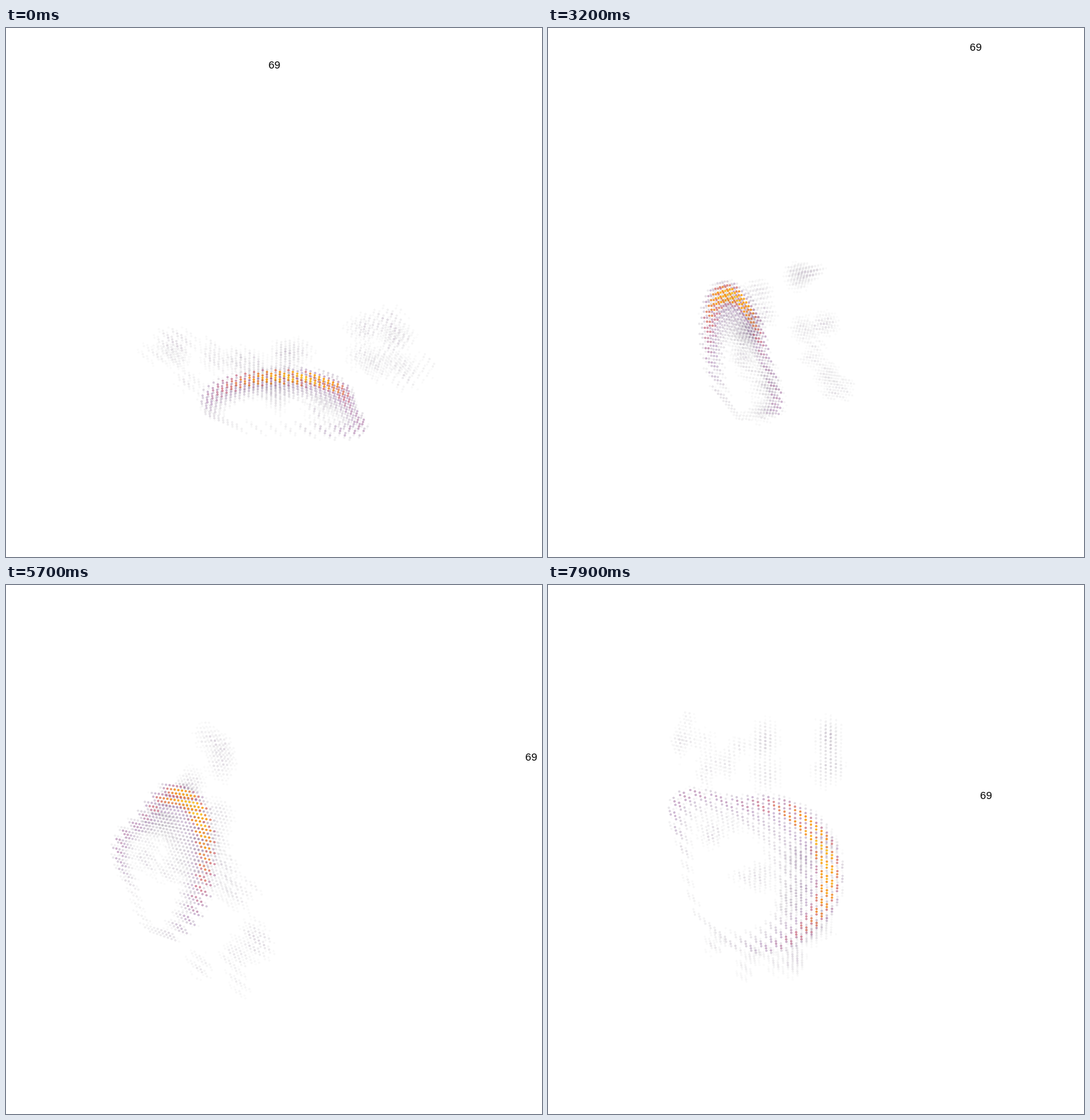
Recreate the animation shown at these times as an HTML page with a canvas. Size 753 by 744 pixels, loop 8 s.

```html
<!DOCTYPE html>
<html lang="en">
<head>
<meta charset="utf-8">
<title>Rotating point volume</title>
<style>
html, body { margin: 0; width: 100%; height: 100%; overflow: hidden; background: #fff; }
canvas { display: block; width: 753px; height: 744px; }
</style>
</head>
<body>
<canvas id="stage" width="753" height="744"></canvas>
<script>
const ctx = document.getElementById('stage').getContext('2d');
const W = 753, H = 744, CX = 376, CY = 372, EYE = 1400;
const LOOP = 8000, STEP = 100, SPIN = Math.PI / 6; // radians per second
const rad = deg => deg * Math.PI / 180;

// Spin axis and two directions across it: x right, y down, z away from the viewer.
const AXIS = [0.582, -0.73, 0.36];
const E1 = [-0.813, -0.532, 0.237];
const E2 = [0.018, -0.43, -0.903];

function camera(angle) {
  const c = Math.cos(angle), s = Math.sin(angle);
  const u = E1.map((e, i) => e * c + E2[i] * s);
  const v = E2.map((e, i) => e * c - E1[i] * s);
  return (p, q, w) => {
    const [x, y, z] = AXIS.map((a, i) => u[i] * p + v[i] * q + a * w);
    const k = EYE / (EYE + z);
    return { x: CX + x * k, y: CY + y * k, z, flat: x };
  };
}

// Dark, purple, red, orange, yellow
const RAMP = [[0, 0, 4], [87, 16, 110], [188, 55, 84], [249, 142, 9], [250, 225, 40]];
function ramp(v) {
  const t = Math.min(0.999, v) * 4, i = Math.floor(t);
  return RAMP[i].map((a, n) => Math.round(a + (RAMP[i + 1][n] - a) * (t - i)));
}

let seed = 11;
function random() {
  seed = (seed * 16807) % 2147483647;
  return seed / 2147483647;
}
const spread = (mid, half) => mid + half * (2 * random() - 1);

// Bright curved sheet seen face on: a round rim with one corner, glowing on the right.
function sheet(x, y, depth) {
  const dx = x - 290, dy = y - 408, a = Math.atan2(dy, dx);
  const corner = Math.exp(-(((a + rad(135)) / 0.36) ** 2));
  const rim = 108 + 9 * Math.cos(a) + 55 * corner;
  const glow = 0.05 + 0.85 * ((1 + Math.cos(a + 0.25)) / 2) ** 1.6 + 0.2 * corner;
  const d = rim - Math.hypot(dx, dy);
  const width = 7 + 12 * glow;
  const core = glow * Math.exp(-(((d - width * 0.75) / width) ** 4));
  const fill = d > 0 ? Math.min(0.38, glow) * Math.max(0, 1 - d / (15 + 105 * glow)) : 0;
  return Math.max(core, fill) * Math.exp(-(((depth + 138) / 11) ** 4));
}

// Faint clouds scattered in a few regions around the sheet
const REGIONS = [
  { x: 295, y: 228, depth: -62, w: 110, h: 42, thick: 16, count: 18 },
  { x: 300, y: 530, depth: -65, w: 65, h: 28, thick: 14, count: 7 },
  { x: 365, y: 425, depth: -100, w: 38, h: 65, thick: 16, count: 13 },
  { x: 255, y: 380, depth: -128, w: 48, h: 45, thick: 6, count: 6 }
];
const blobs = REGIONS.flatMap(r => Array.from({ length: r.count }, () => ({
  x: spread(r.x, r.w), y: spread(r.y, r.h), depth: spread(r.depth, r.thick),
  rx: spread(14, 6), ry: spread(17, 7), v: spread(0.085, 0.03)
})));
function clouds(x, y, depth) {
  let sum = 0;
  for (const b of blobs) {
    const r = ((x - b.x) / b.rx) ** 2 + ((y - b.y) / b.ry) ** 2 + ((depth - b.depth) / 16) ** 2;
    if (r < 3) sum += b.v * Math.exp(-r);
  }
  return Math.min(sum, 0.14);
}

// Layers of a staggered grid; only the visible points are kept.
const points = [];
const front = camera(rad(237)), side = camera(rad(123));
for (let i = -38; i <= 24; i++) {
  for (let j = -22; j <= 22; j++) {
    for (let k = -22; k <= 18; k++) {
      const p = i * 7.7, q = (j + (i & 1) / 2) * 9.6, w = k * 11.2;
      const { x, y } = front(p, q, w), depth = side(p, q, w).flat;
      const v = Math.max(sheet(x, y, depth), clouds(x, y, depth) * spread(0.9, 0.3));
      if (v < 0.014) continue;
      points.push({ p, q, w, color: `rgba(${ramp(v)},${Math.min(0.9, v * 1.15).toFixed(3)})` });
    }
  }
}

function draw(ms) {
  const view = camera(SPIN * ms / 1000);
  ctx.fillStyle = '#fff';
  ctx.fillRect(0, 0, W, H);
  const dots = points.map(o => ({ ...view(o.p, o.q, o.w), color: o.color }));
  dots.sort((a, b) => b.z - a.z);
  for (const d of dots) {
    ctx.fillStyle = d.color;
    ctx.beginPath();
    ctx.arc(d.x, d.y, 1.7, 0, 2 * Math.PI);
    ctx.fill();
  }
  const label = view(227.6, 0, 320);
  ctx.fillStyle = '#000';
  ctx.font = '15px "Liberation Sans", Arial, sans-serif';
  ctx.textAlign = 'center';
  ctx.fillText('69', label.x, label.y + 1.5);
}

const start = performance.now();
let shown = -1;
function tick() {
  const ms = Math.floor(((performance.now() - start) % LOOP) / STEP) * STEP;
  if (ms !== shown) draw(shown = ms);
  requestAnimationFrame(tick);
}
tick();
</script>
</body>
</html>
```
